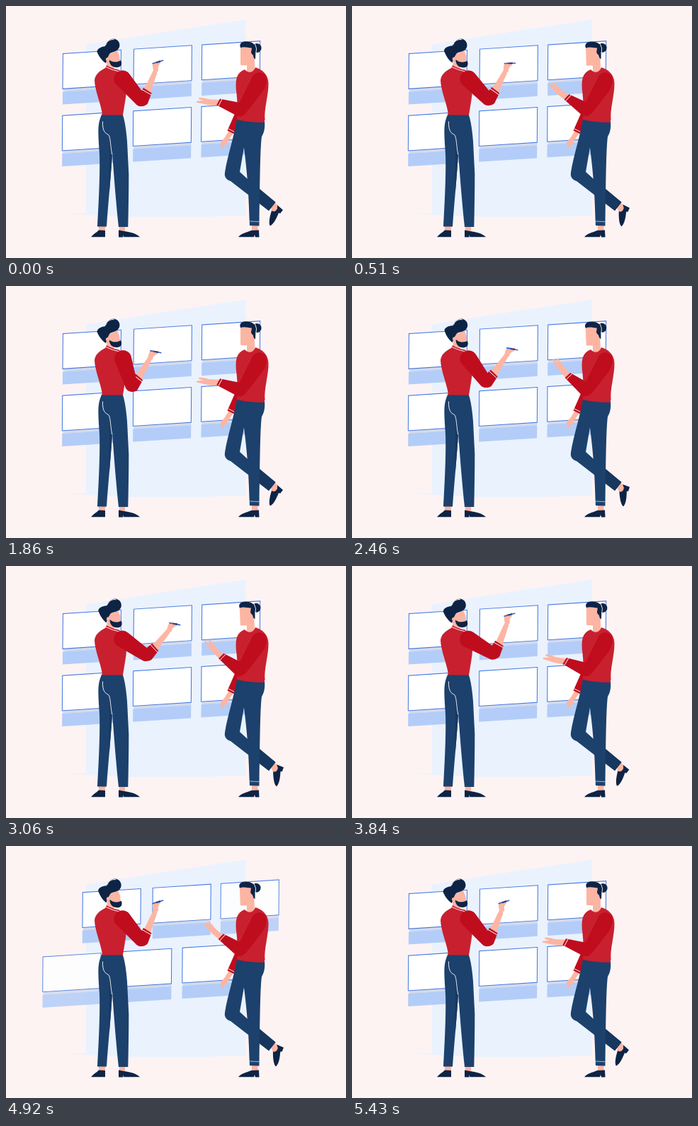
Recreate the animation shown at these times as an HTML page. Size 480 by 357 pixels, loop 5.46 s.

```html
<!DOCTYPE html>
<html>
<head>
<meta charset="utf-8">
<style>
html, body { margin: 0; width: 100%; height: 100%; overflow: hidden; background: #fef3f3; }
svg { display: block; width: 100%; height: 100%; }
.skin { fill: #fdb5a3; }
.dark { fill: #0e2445; }
.red { fill: #c8202f; }
.sleeve { fill: #bf0d1e; }
.jeans { fill: #1c416c; }
.shade { fill: #17375e; }
.seam { fill: none; stroke: #fff; stroke-width: .9; stroke-linecap: round; }
.sheet { fill: #fff; stroke: #3f74e0; }
.shadow { fill: #d3daec; }
.strip { fill: #b3cdf8; }
</style>
</head>
<body>
<svg viewBox="0 0 480 357">
  <path fill="#eaf2fe" d="M113 54L338.500 19V297Q220 302 113 296L85 293.8L113 293.5Z"/>
  <g id="cards" transform="matrix(1 -.0645 -.008 1 0 0)"></g>

  <g id="man">
    <path class="skin" d="M131 311H140V320H131ZM160 311H168V320H160Z"/>
    <path class="dark" d="M120 327.300C123 323 128 321 131 317.500L140 318V327.300ZM159 317.500L167 319C174 320 184 322 189 327.300H166.500L165.500 324V327.500H159Z"/>
    <path class="jeans" d="M135.500 153H164.500C168 163 170 178 171 192L173.300 238C173.300 265 172.800 290 172.300 313H159C156 285 152.500 245 150 206C148 245 144 282 142 312.500H129C130.500 285 133 240 132 210C131 195 130 182 130.500 172C131 164 133 158 135.500 153Z"/>
    <path class="shade" d="M146 183C148 190 149 199 150 208C149 225 147.500 245 146 262C145 235 147 205 146 183Z"/>
    <path class="seam" d="M136.500 164C136 175 139 180 144 182C147.500 184 147 194 149.500 210"/>
    <g id="manHead">
      <path class="skin" d="M142 70L157 63L160 70L161.500 80L152 85L153 90L142 87Z"/>
      <path class="dark" d="M128.500 65C128.500 61 133 58 140 57C142 49 148 46 153 46.500C161 48 163 58 157 62.500C153 65.500 149 65 146 68L143.500 73L141 81C135 77 131 71 128.500 65Z"/>
      <path class="dark" d="M145.500 76C150 80.500 157 80 162 77C165 83 162 87 156 87C150 87 146 83 145.500 76Z"/>
      <circle class="skin" cx="143.500" cy="75.500" r="2.600"/>
      <path class="seam" d="M141 55C142 50 147 47 152 47.500"/>
    </g>
    <path class="red" d="M142 84C148 88 154 89 160 90.500L163 96C171 104 171 118 168.500 133L165 154.500H136C135 141 125 119 125 105C126 96 134 91 140 88Z"/>
    <path class="seam" d="M141 86.500Q150 91 160.500 93"/>
    <g id="upper">
      <g id="fore">
        <path class="skin" d="M14 -4L46 -3V3.500L14 6.500Z"/>
        <g id="hand">
          <path class="skin" d="M-3.500 2L-2.500 -7Q-1 -11 3 -12L6 -11L10 -12.500Q11.500 -8 7 -6L4.500 -3L3.500 2Q0 4 -3.500 2Z"/>
          <path d="M-2 -10H14.500" stroke="#2f63d2" stroke-width="1.600"/>
          <path d="M4 -10H10" stroke="#123a7c" stroke-width="1.800"/>
        </g>
        <path class="sleeve" d="M0 -8.500L18 -5.500L16 8L0 9A9 9 0 0 1 0 -8.500Z"/>
        <path class="seam" d="M15 -6L13.500 8"/>
      </g>
      <path class="sleeve" d="M0 -12L40 -8.500A9 9 0 0 1 40 9L-3 12A12 12 0 0 1 0 -12Z"/>
    </g>
  </g>

  <g id="woman">
    <path class="skin" d="M315 176L321 180L314 190L312 197L310 194L306 202L303.500 199L303 193L309 186ZM347 309H355.500V320H347Z"/>
    <path class="sleeve" d="M325 148L312.500 176.500L321.500 181L331 164Z"/>
    <path class="seam" d="M314 174L322 178"/>
    <g id="foot">
      <path class="skin" d="M374 284L379 278L385 284L381 291L375 292Z"/>
      <path class="dark" d="M383 282L391 289L387 294L385 293C382 300 379 308 373 311.500C370.500 309 372 299 375 290Q380 293 383 287Z"/>
    </g>
    <path class="jeans" d="M326 160C322 185 312 215 309 236C308 242 311 246 317 248L371 290L380.500 278L342 246L330 235L336 200L345 164Z"/>
    <path class="shade" d="M356 257.500L380.500 278L371 290L356 278.500Z"/>
    <path class="dark" d="M328 327.300C332 322 340 321 346 318L357 317.500L357.500 327.500H352L351 324L350 327.300Z"/>
    <path class="jeans" d="M331 161L365 163C366 174 364 180 361 185C359 200 358.500 235 357.500 311.500L344 311C342.500 270 342 245 334 185Z"/>
    <path class="seam" opacity=".7" d="M344 305L357 305.500"/>
    <g id="womanHead">
      <path class="skin" d="M331 56H347L348.500 68L351 74V94H340V84L332 84Q331 84 331 82Z"/>
      <path class="dark" d="M331 59C328 51 337 49 344 51C350 52 353 56 352.500 64L352 75.500L349.500 73C350 69 346 68 346 65.500L347 59.500C342 59 336 57 331 59Z"/>
      <circle class="dark" cx="354" cy="59.500" r="6.600"/>
      <path class="seam" d="M351.500 53.500Q355 60 353 67"/>
    </g>
    <path class="red" d="M337 90C342 95.500 349 95 352 87C362 90 370 97 370.500 109C371 125 364 146 365.500 161L364 165Q343 165 326 161C327 150 327 135 325 120C324 104 325 95 337 90Z"/>
    <g id="womanFore">
      <g id="womanHand">
        <path class="skin" d="M2 -4C-8 -4 -14 -3 -19 -5L-28 -5.500Q-29.500 -4 -28 -3L-22 -2L-31.500 0Q-32.500 1.500 -30 2L-20 3.500C-14 5 -6 4 2 4.500Z"/>
      </g>
      <path class="sleeve" d="M2 -9L-32 -5.500L-34 4.500L-2 10.500A10 10 0 0 0 2 -9Z"/>
      <path class="seam" d="M-29 -5.500L-31 4.500"/>
    </g>
    <path class="sleeve" d="M347 102C350 93 361 92 366 98C370 106 367 115 361 123L340 150C335 156 326 157 322 149L330 136Z"/>
  </g>
</svg>
<script>
const LOOP = 5460, SWAY = LOOP / 3;
const $ = id => document.getElementById(id);
const clamp = v => Math.max(0, Math.min(1, v));
const ease = u => (1 - Math.cos(Math.PI * clamp(u))) / 2;
const mix = (a, b, u) => a + (b - a) * u;

// time, upper arm angle, forearm angle, pen angle
const armKeys = [
  [0, 49, -66, -17],
  [1020, 43, -55, 13],
  [1860, 72, -58, 11],
  [3060, 34, -49, 11],
  [3840, 30, -67, -15],
  [4530, 49, -66, -17],
  [LOOP, 49, -66, -17]
];

// slots 0 and 4 lie outside the visible row
const slots = [-18, 81, 181, 277.3, 373];
const rows = [{ y: 72.8, dir: -1 }, { y: 160.4, dir: 1 }];
for (const row of rows) {
  row.cards = slots.map(() => {
    $('cards').insertAdjacentHTML('beforeend', `<g>
      <rect class="shadow" x="1" y="50" width="81" height="4"/>
      <rect class="sheet" width="82" height="49.8"/>
      <rect class="strip" y="53.800" width="82" height="18.2"/></g>`);
    return $('cards').lastElementChild;
  });
}

function slideCards(t) {
  const since = t - 4155, p = ease(since / 1186);
  const fadeIn = clamp(since / 900), fadeOut = 1 - clamp(since / 620);
  for (const { y, dir, cards } of rows) {
    const entering = dir < 0 ? 4 : 0, leaving = dir < 0 ? 1 : 3;
    cards.forEach((card, i) => {
      const x = mix(slots[i], slots[i + dir] ?? slots[i], p);
      card.setAttribute('transform', `translate(${x} ${y})`);
      card.setAttribute('opacity',
        i === entering ? fadeIn : i === leaving ? fadeOut : i % 4 ? 1 : 0);
    });
  }
}

function turn(id, angle, x, y) {
  $(id).setAttribute('transform', `rotate(${angle} ${x} ${y})`);
}

function joint(id, x, y, angle) {
  $(id).setAttribute('transform', `translate(${x} ${y}) rotate(${angle})`);
}

function draw(t) {
  slideCards(t);

  const k = armKeys.findIndex(key => key[0] > t);
  const from = armKeys[k - 1], to = armKeys[k];
  const u = ease((t - from[0]) / (to[0] - from[0]));
  const [, upper, fore, pen] = from.map((v, i) => mix(v, to[i], u));
  joint('upper', 165.5, 104.5, upper);
  joint('fore', 40, 0, fore - upper);
  joint('hand', 48, 0, pen - fore);

  const w = (1 - Math.cos(2 * Math.PI * t / SWAY)) / 2;
  turn('manHead', 6 * w, 152, 88);
  turn('womanHead', -3 * w, 346, 90);
  turn('foot', -26 * w, 380, 284);
  joint('womanFore', 331, 146, mix(17, 40, w));
  joint('womanHand', -32, 0, mix(-14, 21, w));
}

const start = performance.now();
function tick() {
  draw((performance.now() - start) % LOOP);
  requestAnimationFrame(tick);
}
tick();
</script>
</body>
</html>
```
